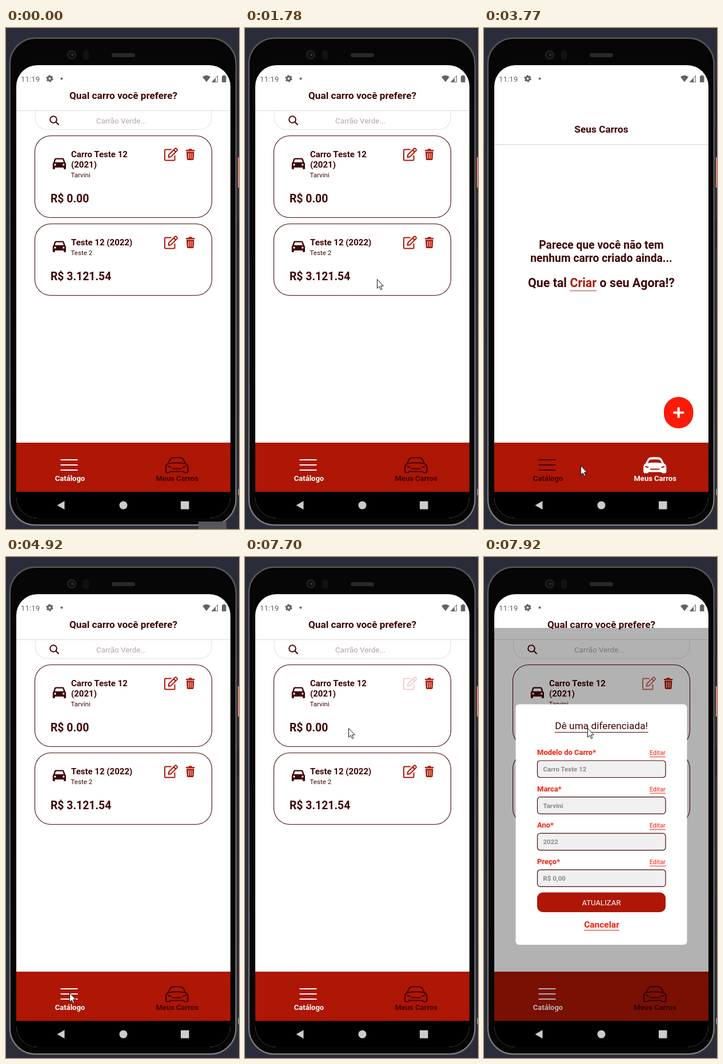
Animation, 408 px wide and 876 px high, one loop 7.99 s. Source, as an HTML page:

```html
<!DOCTYPE html>
<html lang="pt-BR">
<head>
<meta charset="utf-8">
<title>Catálogo de carros</title>
<style>
html, body { margin: 0; width: 100%; height: 100%; overflow: hidden; background: #2a2c3a; }
svg { display: block; }
text { font-family: Roboto, Arial, sans-serif; }
.b { font-weight: 700; }
.m { text-anchor: middle; }
.ink { fill: #3f0303; }
.name { font-size: 15px; font-weight: 700; }
.brand { font-size: 11.6px; }
.price { font-size: 19.4px; font-weight: 700; }
.tab { font-size: 13px; font-weight: 700; text-anchor: middle; }
.label { font-size: 13px; font-weight: 700; fill: #f51c08; }
.edit { font-size: 10.9px; fill: #f51c08; }
.value { font-size: 11.5px; font-weight: 700; fill: #8b8a8a; }
.card { fill: none; stroke: #470808; stroke-width: 1.1; }

/* 1% of the loop = 79.9 ms */
.list, .garage, .shade, .chip { animation: 7990ms step-end infinite; }
.list { animation-name: list; }
.garage { animation-name: garage; }
.shade { animation-name: shade; }
.chip { animation-name: chip; }
.dialog { animation: dialog 7990ms linear infinite; }
.pressed { animation: press 7990ms linear infinite; }
.cursor { animation: move 7990ms linear infinite; }

@keyframes list { 0% { visibility: visible } 38.55% { visibility: hidden } 58.8%, 100% { visibility: visible } }
@keyframes garage { 0% { visibility: hidden } 38.55% { visibility: visible } 58.8%, 100% { visibility: hidden } }
@keyframes shade { 0% { opacity: 0 } 97.25%, 100% { opacity: .3 } }
@keyframes chip { 0% { opacity: 1 } .87%, 100% { opacity: 0 } }
@keyframes dialog { 0%, 97.24% { opacity: 0 } 97.25% { opacity: .88 } 99.1%, 100% { opacity: 1 } }
@keyframes press { 0%, 82.3% { opacity: 1 } 84.9%, 97.2% { opacity: .2 } 99.1%, 100% { opacity: .62 } }
@keyframes move {
  0%, 2.25% { transform: translate(130px, 890px) }
  3.13% { transform: translate(125px, 850px) }
  5% { transform: translate(70px, 640px) }
  6.5% { transform: translate(38px, 450px) }
  8.26% { transform: translate(90px, 320px) }
  10% { transform: translate(170px, 268px) }
  12.64% { transform: translate(270px, 300px) }
  14.4% { transform: translate(350px, 230px) }
  16.15% { transform: translate(392px, 206px) }
  17.9% { transform: translate(396px, 270px) }
  20% { transform: translate(330px, 370px) }
  21.4% { transform: translate(262px, 420px) }
  22.25%, 23.1% { transform: translate(231px, 439px) }
  23.15% { transform: translate(214px, 566px) }
  24.03% { transform: translate(190px, 610px) }
  25.8% { transform: translate(122px, 720px) }
  26.7% { transform: translate(130px, 770px) }
  28.4% { transform: translate(215px, 774px) }
  30.2% { transform: translate(296px, 770px) }
  31.04%, 33.5% { transform: translate(284px, 766px) }
  34.4%, 43.5% { transform: translate(296px, 762px) }
  44.4% { transform: translate(299px, 764px) }
  46.3% { transform: translate(215px, 765px) }
  47.15%, 48% { transform: translate(169px, 765px) }
  50.06% { transform: translate(130px, 765px) }
  52.3% { transform: translate(102px, 764px) }
  53.2% { transform: translate(109px, 761px) }
  54.9%, 65.7% { transform: translate(111px, 762px) }
  67.6% { transform: translate(150px, 690px) }
  70.1% { transform: translate(290px, 540px) }
  72% { transform: translate(376px, 400px) }
  73.8% { transform: translate(340px, 280px) }
  75.5% { transform: translate(296px, 239px) }
  76.35% { transform: translate(292px, 236px) }
  77.3%, 78.16% { transform: translate(288px, 230px) }
  79.1%, 87.5% { transform: translate(288px, 224px) }
  90.1% { transform: translate(270px, 262px) }
  93.2% { transform: translate(215px, 290px) }
  96.3%, 100% { transform: translate(181px, 299px) }
}
</style>
</head>
<body>
<svg width="408" height="876" viewBox="0 0 408 876">
  <defs>
    <clipPath id="screen"><rect x="18" y="65" width="375" height="792" rx="37"/></clipPath>
    <clipPath id="scroll"><rect x="18" y="145" width="375" height="580"/></clipPath>
    <linearGradient id="rim" x2="0" y2="1">
      <stop offset="0" stop-color="#59595b"/>
      <stop offset=".5" stop-color="#6c6c6e"/>
      <stop offset="1" stop-color="#858587"/>
    </linearGradient>
    <path id="car" fill-rule="evenodd" d="M87 227.500H99.500Q101 227.500 101.600 229L103.700 235Q105 236 105 237.500V245.500Q105 247 103.500 247H102.500Q101 247 101 245.500V244H85.800V245.500Q85.800 247 84.300 247H83.300Q81.800 247 81.800 245.500V237.500Q81.800 236 83 235L85 229Q85.600 227.500 87 227.500ZM87.300 229.800L85.700 234.700H101L99.300 229.800ZM86 237.300A1.700 1.700 0 1 0 86 240.700A1.700 1.700 0 1 0 86 237.300ZM100.800 237.300A1.700 1.700 0 1 0 100.800 240.700A1.700 1.700 0 1 0 100.800 237.300Z"/>
    <g id="pencil" fill="none" stroke="#ae1606" stroke-width="2" stroke-linejoin="round" stroke-linecap="round">
      <path d="M289 212.500H279.500Q278 212.500 278 214V230Q278 231.500 279.500 231.500H294Q295.500 231.500 295.500 230V223.500"/>
      <path d="M284.500 226L285.300 221.500L296 210.800Q297.200 209.800 298.400 211L299.500 212.100Q300.500 213.300 299.500 214.400L288.900 225.100ZM293.600 213.200L297.100 216.700"/>
    </g>
    <g id="trash">
      <path fill="#ae1606" d="M315 213H319.500L320.500 211.200H325L326 213H330.300V215.300H315ZM316 216.300H329.400L328.600 229.200Q328.400 231 326.800 231H318.600Q317 231 316.800 229.200Z"/>
      <path d="M319.600 218.500V228.500M322.700 218.500V228.500M325.800 218.500V228.500" stroke="#fff" stroke-width="1"/>
    </g>
    <path id="bars" d="M95.500 755H125.500M95.500 764H125.500M95.500 773H125.500" stroke-width="2"/>
    <path id="shell" d="M280 767Q280 764 283.500 762L287.500 754.300Q289 751.800 292 751.500Q299 751 306 751.500Q309 751.800 310.500 754.300L314.500 762Q318.500 764 318.500 767V775.500Q318.500 777.500 316.500 777.500H313Q311.500 777.500 311 775.500H287.500Q287 777.500 285.500 777.500H282Q280 777.500 280 775.500Z"/>
  </defs>

  <!-- handset -->
  <rect width="408" height="876" fill="#2a2c3a"/>
  <rect x="406" y="226" width="2" height="53" fill="#e57f78"/>
  <path d="M406.500 90V225M406.500 333V383" stroke="#1b1c25"/>
  <rect x="406.500" y="806" width="1.500" height="11" fill="#9a9aa2"/>
  <rect x="5.500" y="16.500" width="398.500" height="854" rx="46" fill="#030303" stroke="#37373a" stroke-width="2"/>
  <rect x="7" y="18" width="395.500" height="851" rx="44.500" fill="none" stroke="url(#rim)" stroke-width="2"/>
  <rect x="10.500" y="22" width="388.500" height="843" rx="41" fill="#060606"/>
  <circle cx="115" cy="47" r="8.500" fill="#1b1b1d"/>
  <circle cx="115" cy="47" r="4.500" fill="#0b0b0d"/>
  <circle cx="116" cy="47" r="1.800" fill="#3c3e42"/>
  <rect x="135" y="39" width="10" height="17" rx="4" fill="#111113"/>
  <rect x="185" y="44" width="41" height="7" rx="3.500" fill="#29292b"/>
  <rect class="chip" x="337" y="863" width="49" height="13" fill="#55565d"/>

  <g clip-path="url(#screen)">
    <rect x="18" y="65" width="375" height="792" fill="#fff"/>

    <g fill="#636363">
      <text x="26" y="94" font-size="13.3">11:19</text>
      <circle cx="76.500" cy="88.500" r="3.400" fill="none" stroke="#636363" stroke-width="3"/>
      <circle cx="76.500" cy="88.500" r="5.300" fill="none" stroke="#636363" stroke-width="1.800" stroke-dasharray="2.950 2.600"/>
      <circle cx="97.500" cy="88.500" r="2"/>
      <path d="M344 85.500Q351 80 358 85.500L351 94.500Z"/>
      <path d="M370.500 83.500V94.500H360.500Z" fill="none" stroke="#636363"/>
      <path d="M367 87.500V94.500H360.500Z"/>
      <path d="M378 84H380V82.500H383.500V84H385.500V95H378Z"/>
    </g>

    <rect x="18" y="725" width="375" height="86" fill="#ae1605"/>

    <g class="list">
      <text class="b m ink" x="205.500" y="124" font-size="17.200">Qual carro você prefere?</text>
      <path d="M18 144.500H393" stroke="#d9d9d9"/>
      <g clip-path="url(#scroll)">
        <rect x="51.500" y="128" width="308.500" height="49.500" rx="20" fill="none" stroke="#eee" stroke-width="2"/>
      </g>
      <g fill="none" stroke="#3f0303" stroke-width="2">
        <circle cx="83" cy="160" r="5.800"/>
        <path d="M87.300 164.300L92.500 169.500"/>
      </g>
      <text class="m" x="202" y="167" font-size="13.400" fill="#b5a5a5">Carrão Verde...</text>

      <rect class="card" x="50.500" y="188.500" width="310" height="143" rx="28"/>
      <g class="ink">
        <use href="#car"/>
        <text class="name" x="114" y="225.500">Carro Teste 12</text>
        <text class="name" x="114" y="243.500">(2021)</text>
        <text class="brand" x="113.500" y="260.500">Tarvini</text>
        <text class="price" x="78" y="305">R$ 0.00</text>
      </g>
      <g class="pressed"><use href="#pencil"/></g>
      <use href="#trash"/>

      <rect class="card" x="50.500" y="342.500" width="310" height="125" rx="28"/>
      <g class="ink">
        <use href="#car" y="145"/>
        <text class="name" x="114" y="379.500">Teste 12 (2022)</text>
        <text class="brand" x="113.500" y="396.500">Teste 2</text>
        <text class="price" x="78" y="441">R$ 3.121.54</text>
      </g>
      <use href="#pencil" y="154"/>
      <use href="#trash" y="154"/>

      <use href="#bars" stroke="#fff"/>
      <text class="tab" x="112" y="792" fill="#fff">Catálogo</text>
      <g fill="none" stroke="#440402" stroke-width="2.200" stroke-linecap="round">
        <use href="#shell"/>
        <path d="M285 761.500Q299 759 313.500 761.500M284 766.500L288.500 768M314.500 766.500L310 768M291.500 770.500H307"/>
      </g>
      <text class="tab" x="299.700" y="792" fill="#440402">Meus Carros</text>
    </g>

    <g class="garage">
      <text class="b m ink" x="205.500" y="183" font-size="17.300">Seus Carros</text>
      <path d="M18 204H393" stroke="#dedede" stroke-width="1.500"/>
      <g class="b m ink">
        <text x="205.500" y="386" font-size="19.300">Parece que você não tem</text>
        <text x="205.500" y="409" font-size="19.300">nenhum carro criado ainda...</text>
        <text x="205.500" y="453" font-size="21.400">Que tal <tspan fill="#ae1606">Criar</tspan> o seu Agora!?</text>
      </g>
      <path d="M150 459.500H197" stroke="#b8332a"/>
      <rect x="315" y="645" width="51.500" height="55" rx="25.700" fill="#fa1b08"/>
      <path d="M333 672.500H348.500M340.700 664.800V680.200" stroke="#fff" stroke-width="4.200" stroke-linecap="round"/>

      <use href="#bars" stroke="#440402"/>
      <text class="tab" x="112" y="792" fill="#440402">Catálogo</text>
      <use href="#shell" fill="#fff" stroke="#fff" stroke-width="1.800"/>
      <path d="M286.500 761L290 755Q299 753.300 308 755L311.500 761Q299 758.500 286.500 761Z" fill="#ae1605"/>
      <path d="M282.500 766.500L288 768.500M316 766.500L310.500 768.500M291 771.500H307.500" stroke="#ae1605" stroke-width="2"/>
      <text class="tab" x="299.700" y="792" fill="#fff">Meus Carros</text>
    </g>

    <rect class="shade" x="18" y="124" width="375" height="687"/>

    <g class="dialog">
      <rect x="55.500" y="257.500" width="300" height="420.500" rx="6" fill="#fff"/>
      <text class="m ink" x="205.700" y="301" font-size="17.300">Dê uma diferenciada!</text>
      <path d="M124 306.500H287.500" stroke="#3f0303"/>
      <g id="fields"></g>
      <rect x="93" y="586.500" width="225" height="34.500" rx="10" fill="#ae1605"/>
      <text class="m" x="205.500" y="609" font-size="13.200" fill="#fff">ATUALIZAR</text>
      <text class="b m" x="206" y="647.500" font-size="15.500" fill="#f51c08">Cancelar</text>
      <path d="M175 652.500H237" stroke="#f51c08"/>
    </g>

    <rect x="18" y="811" width="375" height="46"/>
    <g fill="#cfcbcb">
      <path d="M89.500 834.500L102.500 827V842Z"/>
      <circle cx="205.500" cy="834.500" r="7"/>
      <rect x="306" y="827.500" width="14.500" height="14" rx="1"/>
    </g>
  </g>

  <path class="cursor" d="M.5 .5V16.200L4.100 12.900L6.500 18.500L8.900 17.500L6.500 12H11.400Z" fill="#fff" stroke="#111" stroke-width="1"/>
</svg>
<script>
const fields = [
  ["Modelo do Carro*", "Carro Teste 12"],
  ["Marca*", "Tarvini"],
  ["Ano*", "2022"],
  ["Preço*", "R$ 0,00"]
];
document.getElementById("fields").innerHTML = fields.map(([label, value], i) => `
  <g transform="translate(0 ${i * 63.6})">
    <text class="label" x="93" y="346">${label}</text>
    <text class="edit" x="289.700" y="346">Editar</text>
    <path d="M290 349.500H318" stroke="#f51c08"/>
    <rect x="93.500" y="356" width="224.500" height="29.500" rx="5" fill="#f0f0f0" stroke="#470808" stroke-width="1.200"/>
    <text class="value" x="103.500" y="375">${value}</text>
  </g>`).join("");
</script>
</body>
</html>
```
